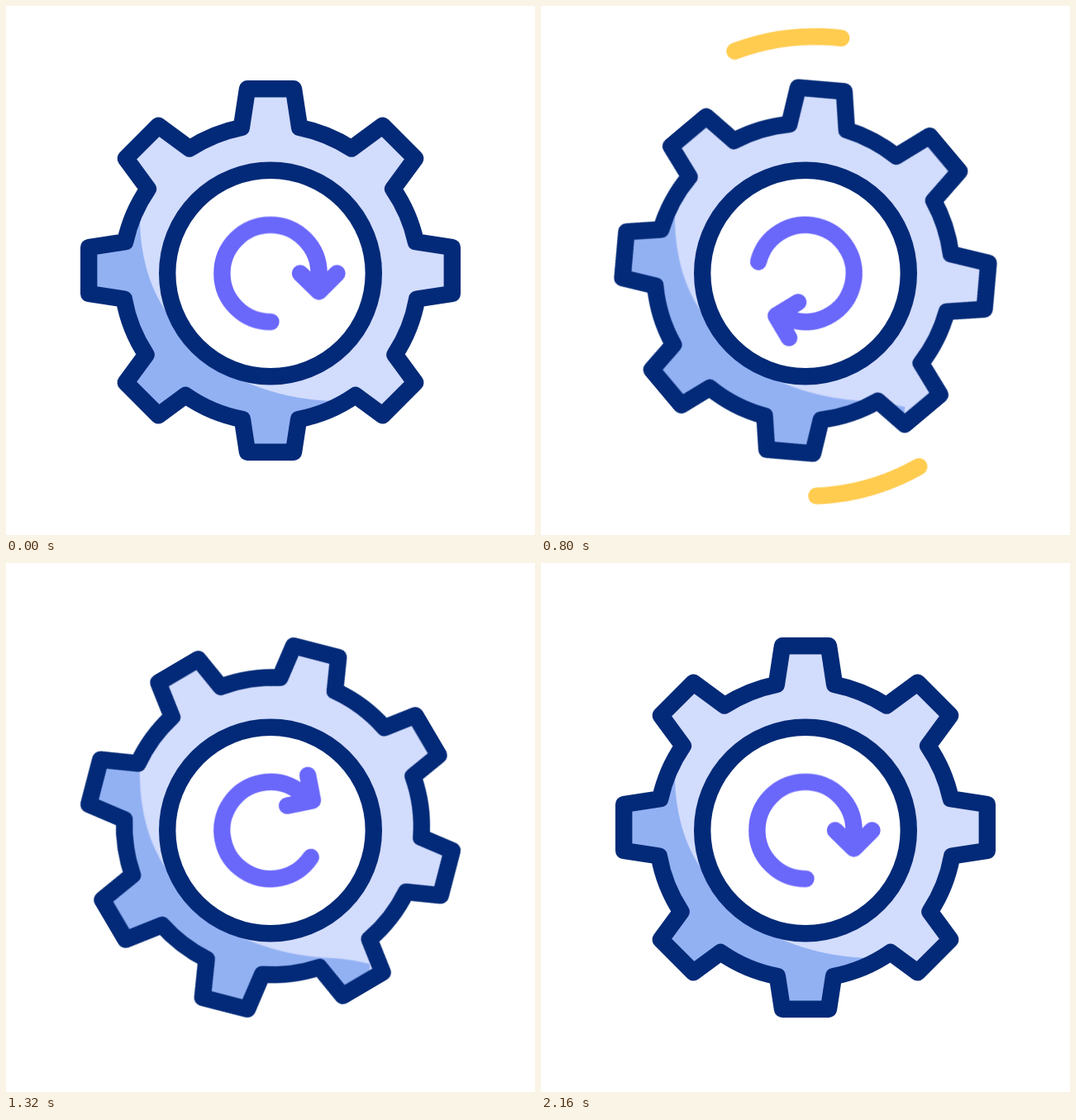
Recreate the animation shown at these times as an HTML page. Size 640x640 px, loop 2240 ms.

```html
<!DOCTYPE html>
<html lang="en">
<head>
<meta charset="utf-8">
<title>Gear refresh</title>
<style>
  /* Ends of the sweeping arcs, one px per degree (pathLength is 360) */
  @property --head { syntax: "<length>"; inherits: false; initial-value: 0px; }
  @property --tail { syntax: "<length>"; inherits: false; initial-value: 0px; }

  html, body { margin: 0; width: 100%; height: 100%; overflow: hidden; background: #fff; }
  svg { display: block; width: 100vw; height: 100vh; }

  .line { fill: none; stroke-width: 20.4; stroke-linecap: round; stroke-linejoin: round; }
  .navy { stroke: #032a78; }
  .violet { stroke: #6a67fb; }
  .yellow { stroke: #ffcc50; }

  .spin, .unspin, .turn, .sweep {
    animation: 2240ms cubic-bezier(.58, 0, .42, 1) infinite;
  }
  .spin { animation-name: spin; }
  .unspin { animation-name: unspin; }
  .turn { animation-name: turn; }
  .sweep {
    animation-name: head, tail, show;
    stroke-dasharray: calc(var(--head) - var(--tail)) 360px;
    stroke-dashoffset: calc(0px - var(--tail));
  }

  @keyframes spin {
    0%, 9.375% { transform: rotate(0deg); }
    95.98%, 100% { transform: rotate(360deg); }
  }
  @keyframes unspin {
    0%, 9.375% { transform: rotate(0deg); }
    95.98%, 100% { transform: rotate(-360deg); }
  }
  @keyframes turn {
    0%, 1.786% { transform: rotate(0deg); }
    85.71%, 100% { transform: rotate(360deg); }
  }
  @keyframes head {
    0%, 14.69% { --head: 0px; }
    39.69%, 100% { --head: 97.5px; }
  }
  @keyframes tail {
    0%, 21.12% { --tail: 0px; }
    46.12%, 100% { --tail: 97.5px; }
  }
  @keyframes show {
    0% { opacity: 0; animation-timing-function: step-end; }
    14.69% { opacity: 1; animation-timing-function: step-end; }
    46.12%, 100% { opacity: 0; }
  }
</style>
</head>
<body>
<svg viewBox="0 0 640 640">
  <defs>
    <path id="rim"/>
    <clipPath id="inside"><use href="#rim"/></clipPath>
  </defs>

  <g transform="translate(331.5 313) rotate(182)">
    <circle class="line yellow sweep" r="276" pathLength="360"/>
  </g>
  <g transform="translate(322 319) rotate(-7)">
    <circle class="line yellow sweep" r="274" pathLength="360"/>
  </g>

  <g transform="translate(320 320)">
    <g class="spin">
      <use href="#rim" fill="#d2dcfd"/>
      <!-- The shade stays still while the gear outline turns over it -->
      <g clip-path="url(#inside)">
        <g class="unspin">
          <path transform="translate(-320 -320)" fill="#92b1f3"
            d="M157 60 L158 188 Q162 228 162 262 C163 300 172 335 190 364
               C215 405 250 438 290 455 Q340 476 395 478 Q415 479 440 485 V620 H40 V60Z"/>
        </g>
      </g>
      <use href="#rim" class="line navy"/>
    </g>
  </g>

  <circle class="line navy" cx="320" cy="323.5" r="124.8" style="fill:#fff"/>
  <g transform="translate(320 323.5)">
    <path class="line violet turn" d="M.5 58.6 A58.6 58.6 0 1 1 58.6 0 V20 M36 0 L58.5 22 L80.5 0"/>
  </g>
</svg>
<script>
  // Eight teeth; the ring between them sits 3.5 below the centre of the teeth.
  const place = (x, y, a) => {
    const c = Math.cos(a), s = Math.sin(a);
    return `${(x * c - y * s).toFixed(2)} ${(x * s + y * c).toFixed(2)}`;
  };
  const foot = (side, a) => {
    const y = 176.5 - 3.5 * Math.cos(a + side * 0.2);
    return place(side * (28 + (220 - y) * 0.152), -y, a);
  };

  let d = "";
  for (let k = 0; k < 8; k++) {
    const a = k * Math.PI / 4;
    d += (k ? "A180 180 0 0 1 " : "M") + foot(-1, a);
    d += "L" + place(-28, -219.8, a) + "L" + place(28, -219.8, a) + "L" + foot(1, a);
  }
  document.getElementById("rim").setAttribute("d", d + "A180 180 0 0 1 " + foot(-1, 0) + "Z");
</script>
</body>
</html>
```
